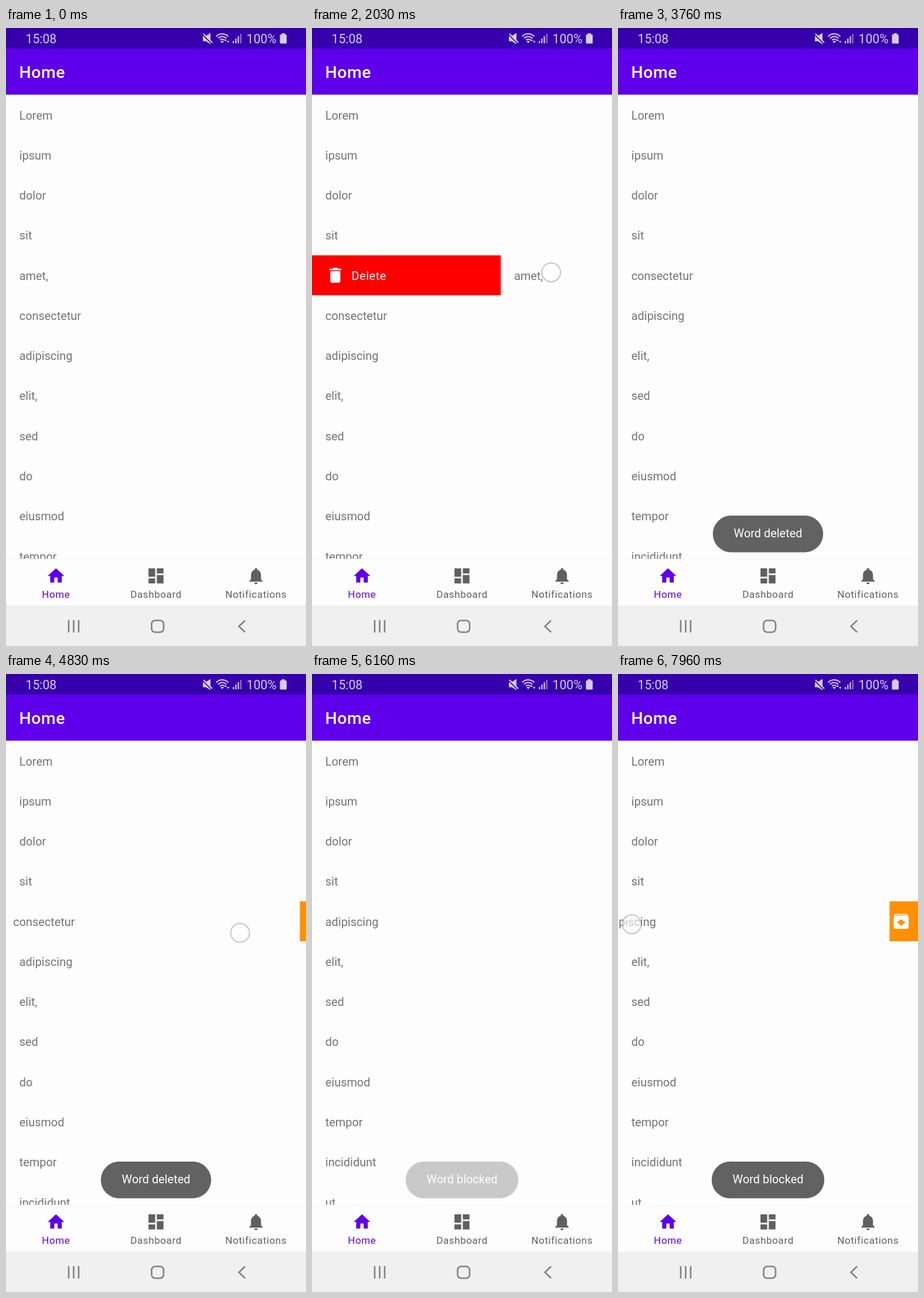
Recreate the animation shown at these times as an HTML page with a canvas. Size 512x1052 px, loop 8 s.

```html
<!DOCTYPE html>
<html lang="en">
<head>
<meta charset="utf-8">
<title>Swipe list</title>
<style>
html, body { margin: 0; overflow: hidden; background: #fdfdfd; }
canvas { display: block; }
</style>
</head>
<body>
<canvas id="stage" width="512" height="1052"></canvas>
<script>
const ctx = document.getElementById('stage').getContext('2d');
const LOOP = 8000, ROW = 68.27, TOP = 113.6, DP = 512 / 360;
const PAPER = '#fdfdfd', INK = '#747474', ICON = '#606060', ACCENT = '#5e00ea';
const STATUS_BG = '#3600ad', STATUS = '#d5cdea';
const WORDS = 'Lorem ipsum dolor sit amet, consectetur adipiscing elit, sed do eiusmod tempor incididunt ut labore'.split(' ');

const ICONS = {
  home: 'M10 20v-6h4v6h5v-8h3L12 3 2 12h3v8z',
  dashboard: 'M3 13h8V3H3zm0 8h8v-6H3zm10 0h8V11h-8zm0-18v6h8V3z',
  bell: 'M12 22c1.1 0 2-.9 2-2h-4c0 1.1.9 2 2 2zm6-6v-5c0-3.07-1.64-5.64-4.5-6.32V4a1.5 1.5 0 0 0-3 0v.68C7.63 5.36 6 7.92 6 11v5l-2 2v1h16v-1z',
  trash: 'M6 19c0 1.1.9 2 2 2h8c1.1 0 2-.9 2-2V7H6zM19 4h-3.5l-1-1h-5l-1 1H5v2h14z',
  archive: 'M20.54 5.23l-1.39-1.68Q18.7 3 18 3H6q-.7 0-1.16.55L3.46 5.23Q3 5.8 3 6.5V19c0 1.1.9 2 2 2h14c1.1 0 2-.9 2-2V6.5q0-.7-.46-1.27zM12 17.5L6.5 12H10v-2h4v2h3.5zM5.12 5l.81-1h12l.94 1z'
};
for (const name in ICONS) ICONS[name] = new Path2D(ICONS[name]);

// dx and y are [time, value] tracks; finger x = x0 + dx until it lifts
const SWIPES = [
  { word: 4, x0: 86, down: 480, lift: 3080, removed: 3170,
    dx: [[560, 0], [900, 40], [1300, 120], [2030, 322], [2500, 385], [3060, 429], [3150, 512]],
    y: [[480, 430], [2030, 416], [3060, 388]] },
  { word: 5, x0: 410, down: 4620, lift: 5640, removed: 5770,
    dx: [[4700, 0], [4950, -20], [5250, -115], [5500, -248], [5640, -370], [5760, -512]],
    y: [[4620, 430], [5500, 474], [5640, 478]] },
  { word: 6, x0: 72, down: 6350, lift: Infinity, removed: Infinity,
    dx: [[6430, 0], [6650, 90], [6900, 230], [7080, 270], [7250, 240], [7550, 100], [7800, -8], [7960, -48.5]],
    y: [[6350, 432], [7080, 424], [7960, 426]] }
];
const TOASTS = [
  { text: 'Word deleted', from: 3540, to: 5430 },
  { text: 'Word blocked', from: 6094, to: Infinity }
];

const clamp = v => Math.max(0, Math.min(1, v));
const ease = v => 0.5 - Math.cos(Math.PI * clamp(v)) / 2;

function track(points, t) {
  let [t0, v0] = points[0];
  for (const [t1, v1] of points) {
    if (t < t1) return t <= t0 ? v0 : v0 + (v1 - v0) * (t - t0) / (t1 - t0);
    [t0, v0] = [t1, v1];
  }
  return v0;
}

function rect(x, y, w, h, color) {
  ctx.fillStyle = color;
  ctx.fillRect(x, y, w, h);
}

function text(str, x, y, size, color, { weight = 400, spacing = 0, align = 'left' } = {}) {
  ctx.font = `${weight} ${size}px Roboto, sans-serif`;
  ctx.letterSpacing = spacing + 'px';
  ctx.textAlign = align;
  ctx.fillStyle = color;
  ctx.fillText(str, x, y);
}

function icon(name, x, y, color) {
  ctx.save();
  ctx.translate(x, y);
  ctx.scale(DP, DP);
  ctx.fillStyle = color;
  ctx.fill(ICONS[name], 'evenodd');
  ctx.restore();
}

function line(points, color, width) {
  ctx.beginPath();
  points.forEach(([x, y]) => ctx.lineTo(x, y));
  ctx.strokeStyle = color;
  ctx.lineWidth = width;
  ctx.stroke();
}

function drawAction(dx, y) {
  ctx.save();
  ctx.beginPath();
  ctx.rect(dx > 0 ? 0 : 512 + dx, y, Math.abs(dx), 68);
  ctx.clip();
  rect(0, y, 512, 68, dx > 0 ? '#ff0000' : '#ff9000');
  if (dx > 0) {
    icon('trash', 22.8, y + 17, '#fff');
    text('Delete', 67.5, y + 42.3, 19.9, '#fff', { spacing: 0.55 });
  } else {
    icon('archive', 466.2, y + 17, '#fff');
    text('Block', 391, y + 42.3, 19.9, '#fff', { spacing: 0.55 });
  }
  ctx.restore();
}

function drawList(t) {
  ctx.save();
  ctx.beginPath();
  ctx.rect(0, 113, 512, 791);
  ctx.clip();
  WORDS.forEach((word, i) => {
    let slot = i, dx = 0;
    for (const s of SWIPES) {
      if (i > s.word) slot -= ease((t - s.removed - 120) / 250);
      if (i === s.word) dx = t < s.removed + 120 ? track(s.dx, t) : 600;
    }
    const y = TOP + slot * ROW;
    if (dx && dx !== 600) drawAction(dx, Math.round(y));
    if (Math.abs(dx) < 512) text(word, 22.8 + dx, y + 42, 19.9, INK);
  });
  ctx.restore();
}

function drawToast({ text: label, from, to }, t) {
  const alpha = clamp((t - from) / 200) * (1 - clamp((t - to) / 200));
  if (!alpha) return;
  ctx.font = '400 19.9px Roboto, sans-serif';
  ctx.letterSpacing = '0px';
  const w = ctx.measureText(label).width + 71.5;
  ctx.globalAlpha = alpha;
  ctx.beginPath();
  ctx.roundRect(256 - w / 2, 830, w, 62.5, 31.2);
  ctx.fillStyle = '#626262';
  ctx.fill();
  // white on near-white paper: the label stays white while the pill fades
  ctx.globalAlpha = 1;
  text(label, 256, 867, 19.9, '#fdfdfd', { align: 'center' });
}

function drawTouch(s, t) {
  ctx.globalAlpha = clamp((t - s.down) / 80) * (1 - clamp((t - s.lift) / 150));
  if (ctx.globalAlpha) {
    const held = Math.min(t, s.lift);
    ctx.beginPath();
    ctx.arc(s.x0 + Math.min(428, track(s.dx, held)), track(s.y, held), 16, 0, 7);
    ctx.fillStyle = 'rgba(255,255,255,.6)';
    ctx.fill();
    ctx.strokeStyle = 'rgba(140,140,155,.5)';
    ctx.lineWidth = 2;
    ctx.stroke();
  }
  ctx.globalAlpha = 1;
}

function drawStatus() {
  rect(0, 0, 512, 35, STATUS_BG);
  text('15:08', 33.5, 25.9, 21.2, STATUS);
  text('100%', 410.5, 25.9, 21.2, STATUS);
  // muted speaker
  ctx.fillStyle = STATUS;
  ctx.fill(new Path2D('M336 13.5h5l8-5v19l-8-5h-5z'));
  line([[336, 11.5], [351, 26.5]], STATUS_BG, 2);
  line([[337, 10], [352, 25]], STATUS, 2.2);
  // wireless arcs with data arrows
  ctx.lineWidth = 2.2;
  for (const r of [5, 9.5, 14]) {
    ctx.beginPath();
    ctx.arc(369, 24, r, -Math.PI * 0.76, -Math.PI * 0.24);
    ctx.stroke();
  }
  ctx.fill(new Path2D('M366 22h6l-3 4zM372.5 22l2.2-3.5 2.2 3.5zM377 22h4.4l-2.2 3.5z'));
  // signal and battery
  [4, 8, 12, 16].forEach((h, i) => rect(387 + i * 4.2, 26 - h, 2.2, h, i < 3 ? STATUS : '#8f7cc6'));
  rect(470.5, 9, 5.5, 3, STATUS);
  ctx.beginPath();
  ctx.roundRect(467.5, 11, 11.5, 15.5, 1.5);
  ctx.fillStyle = STATUS;
  ctx.fill();
}

function drawBars() {
  drawStatus();
  rect(0, 35, 512, 78.5, ACCENT);
  text('Home', 22.6, 84.7, 28.4, '#fff', { weight: 500, spacing: 0.55 });

  rect(0, 904, 512, 79, PAPER);
  rect(0, 903.5, 512, 1, '#f3f3f3');
  [['home', 'Home'], ['dashboard', 'Dashboard'], ['bell', 'Notifications']].forEach(([name, label], i) => {
    const x = 512 * (2 * i + 1) / 6;
    icon(name, x - 17.07, 915.6, i ? ICON : ACCENT);
    text(label, x, 969.6, 17.07, i ? ICON : ACCENT, { spacing: 0.57, align: 'center' });
  });

  const key = '#828282';
  rect(0, 983, 512, 69, '#f0f0f0');
  for (const x of [107, 115.5, 124]) line([[x, 1008], [x, 1029]], key, 2.6);
  ctx.beginPath();
  ctx.roundRect(248.5, 1008.5, 20.5, 20, 6);
  ctx.stroke();
  line([[408, 1008.5], [397.5, 1018.5], [408, 1028.5]], key, 2.6);
}

function draw() {
  const t = performance.now() % LOOP;
  rect(0, 0, 512, 1052, PAPER);
  drawList(t);
  drawBars();
  TOASTS.forEach(toast => drawToast(toast, t));
  SWIPES.forEach(s => drawTouch(s, t));
  requestAnimationFrame(draw);
}
draw();
</script>
</body>
</html>
```
